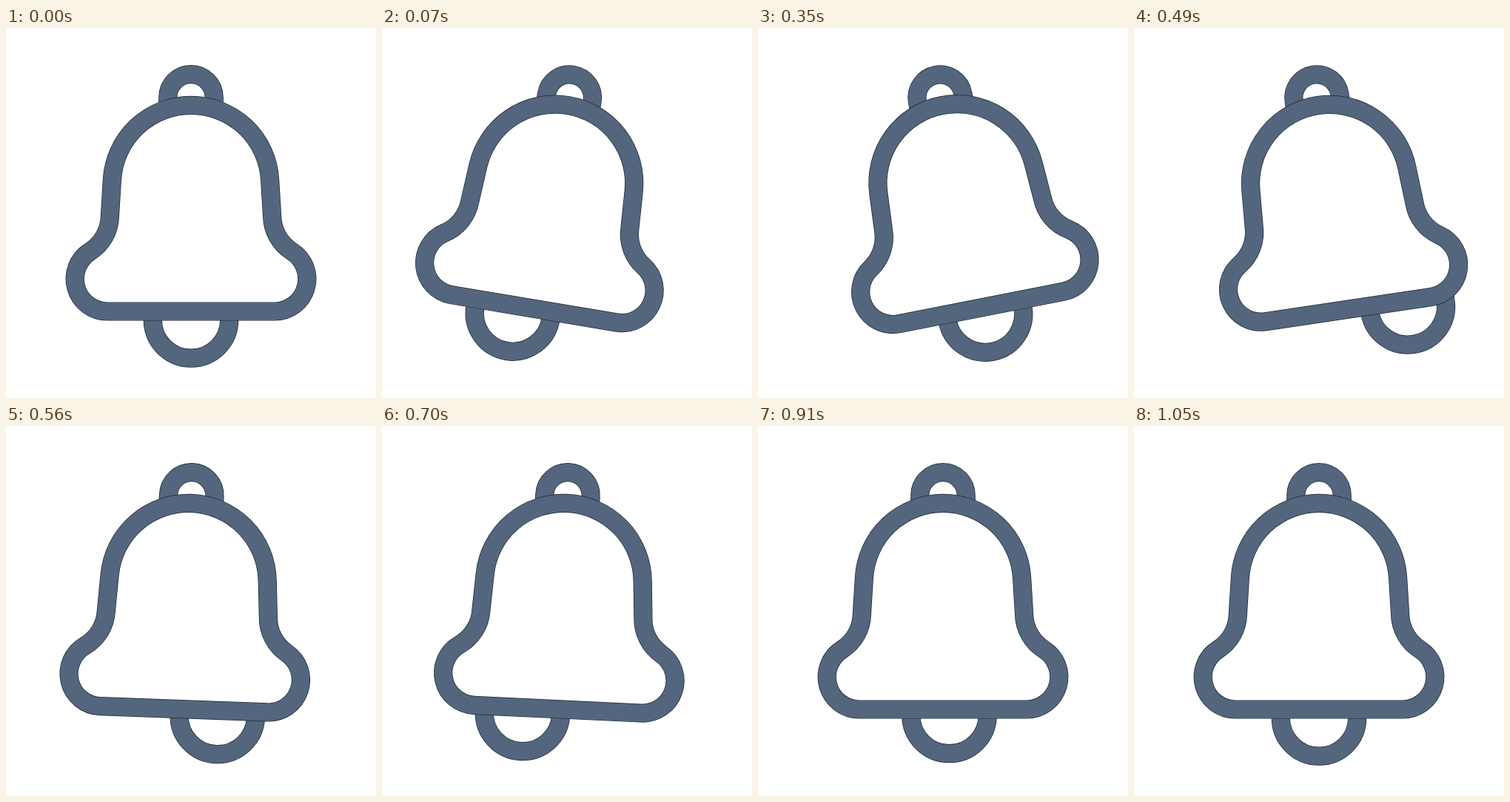
These frames come from a looping animation (500 px wide and 500 px high, 3220 ms). An HTML page:

```html
<!DOCTYPE html>
<html lang="en">
<head>
<meta charset="utf-8">
<title>Ringing bell</title>
<style>
  html, body { margin: 0; width: 100%; height: 100%; overflow: hidden; background: #fff; }
  svg { display: block; width: 100%; height: 100%; }
  .edge { fill: none; stroke: #1d242e; stroke-width: 25.2; }
  .tone { fill: none; stroke: #53667e; stroke-width: 23.8; }
</style>
</head>
<body>
<svg viewBox="0 0 500 500">
  <defs>
    <path id="loop" d="M218.8 106V93.8A31.2 31.2 0 0 1 281.2 93.8V106"/>
    <path id="clapperShape" d="M198.3 383V394.5A51.7 51.7 0 0 0 301.7 394.5V383"/>
    <path id="body" d="M137 383A43.9 43.9 0 0 1 113.6 302A58 58 0 0 0 140.4 254L143.4 204.7A106.8 106.8 0 0 1 356.6 204.7L359.6 254A58 58 0 0 0 386.4 302A43.9 43.9 0 0 1 363 383Z"/>
  </defs>
  <g id="bell">
    <use href="#loop" class="edge"/><use href="#loop" class="tone"/>
    <g id="clapper">
      <use href="#clapperShape" class="edge"/><use href="#clapperShape" class="tone"/>
    </g>
    <use href="#body" class="edge"/><use href="#body" class="tone"/>
  </g>
</svg>
<script>
  const LOOP = 3220, STEP = 70, LAST = 15;
  const bell = document.getElementById('bell');
  const clapper = document.getElementById('clapper');

  // Keyframes are [step, value], linear in between.
  const swing = [[0, 0], [2, 19], [3, 10.3], [5, -11.1], [6, -19], [8, 2.1],
                 [9, 11.9], [10, 2.7], [11, -7.9], [12, 0]];
  const slide = [[0, 0], [3, -82], [5, 3.5], [7, 80], [8, 46], [10, -47],
                 [11, -50], [13, 8.5], [15, 0]];
  const lift = [[0, 0], [3, -2], [5, -2], [8, -4], [10, -4], [13, -3.5], [15, 0]];

  function at(keys, s) {
    const i = keys.findIndex(k => k[0] >= s);
    if (i < 0) return keys[keys.length - 1][1];
    if (i === 0) return keys[0][1];
    const [s0, v0] = keys[i - 1], [s1, v1] = keys[i];
    return v0 + (v1 - v0) * (s - s0) / (s1 - s0);
  }

  function draw(ms) {
    const s = Math.min(LAST, Math.floor((ms % LOOP) / STEP));
    bell.setAttribute('transform', `rotate(${at(swing, s)} 250 114)`);
    clapper.setAttribute('transform', `translate(${at(slide, s)} ${at(lift, s)})`);
  }

  function tick() {
    draw(performance.now());
    requestAnimationFrame(tick);
  }
  tick();
</script>
</body>
</html>
```
